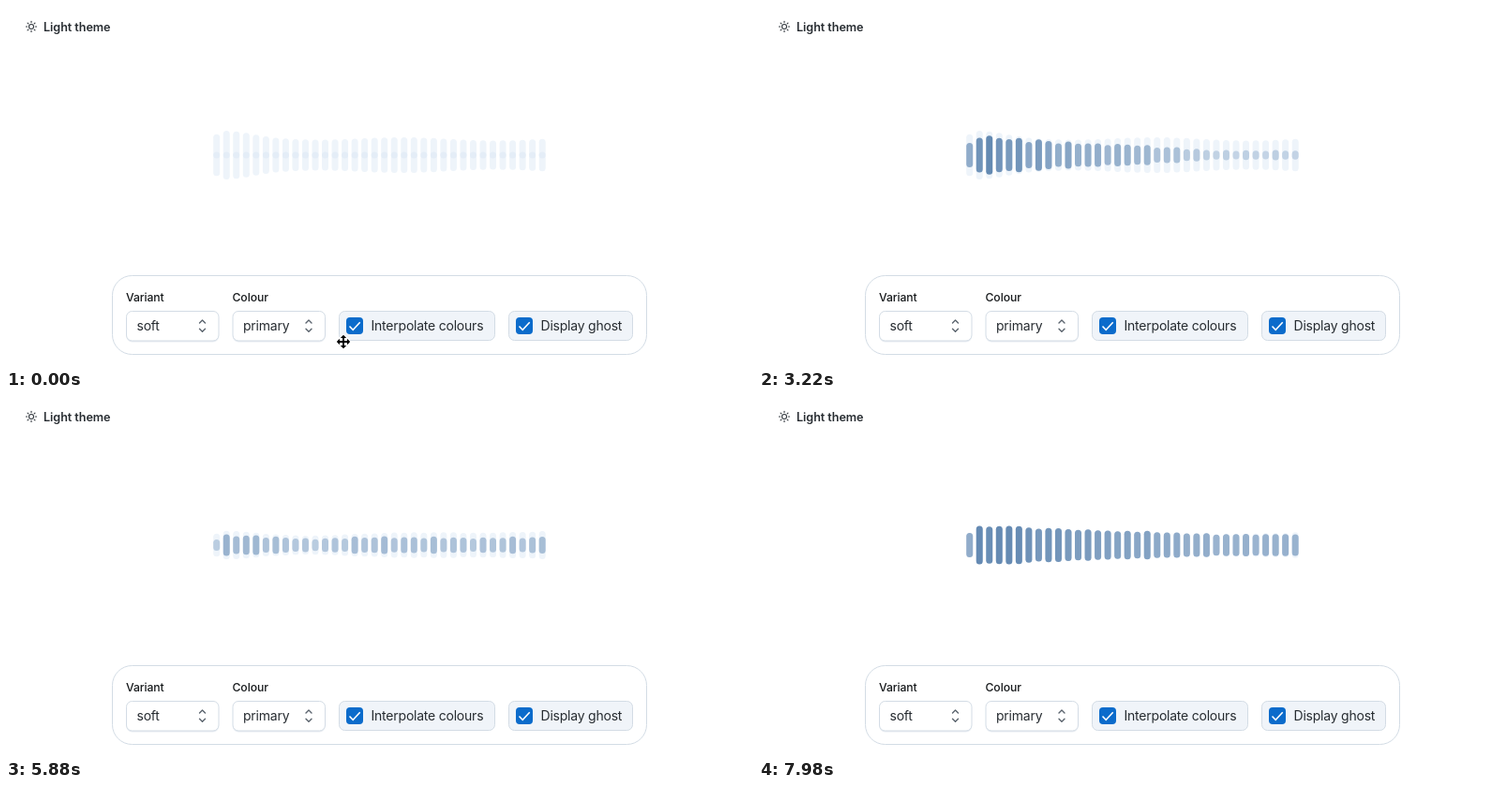
An HTML page with a canvas that plays this animation: 797 by 386 pixels, repeating every 8 s.

```html
<!DOCTYPE html>
<html lang="en">
<head>
<meta charset="utf-8">
<title>Waveform</title>
<style>
  html, body { margin: 0; width: 100%; height: 100%; overflow: hidden; background: #fff; }
  canvas, svg { position: absolute; left: 0; top: 0; width: 797px; height: 386px; }
  text { font-family: Inter, "Open Sans", sans-serif; fill: #272c31; }
  .label { font-size: 12.2px; font-weight: 500; letter-spacing: -.08px; fill: #171a1c; }
  .title { font-size: 12.6px; font-weight: 600; letter-spacing: -.05px; }
  .body { font-size: 14px; letter-spacing: -.22px; }
  .line { fill: none; stroke: #5b646e; stroke-width: 1.4; stroke-linecap: round; stroke-linejoin: round; }
  .frame { stroke: #d3dce5; }
  .soft { fill: #f0f4f9; }
  .white { fill: #fff; }
</style>
</head>
<body>
<canvas id="wave"></canvas>
<svg viewBox="0 0 797 386">
  <defs>
    <g id="select">
      <rect x=".5" y="2" width="98.5" height="31.5" rx="6" fill="#dce3eb" opacity=".6"/>
      <rect class="white frame" x=".5" y=".5" width="98.5" height="31.5" rx="6"/>
      <path class="line" d="M78.500 13l3-3 3 3M78.500 19.300l3 3 3-3"/>
    </g>
    <g id="check">
      <rect width="18" height="18" rx="4" fill="#0b6bcb"/>
      <path d="M3.500 9.500l3.700 3.800 7.500-8" fill="none" stroke="#fff" stroke-width="1.5"/>
    </g>
    <path id="arrow" d="M-1 0V-4H-3.200L0 -7.200 3.200 -4H1V0Z"/>
    <g id="arrows">
      <use href="#arrow"/>
      <use href="#arrow" transform="rotate(90)"/>
      <use href="#arrow" transform="rotate(180)"/>
      <use href="#arrow" transform="rotate(270)"/>
    </g>
  </defs>

  <g id="sun" class="line" style="stroke:#32383e;stroke-width:1.1">
    <circle cx="27" cy="22" r="2.5"/>
  </g>
  <text class="title" x="40" y="27">Light theme</text>

  <rect class="white frame" x="113.5" y="287.5" width="570" height="84" rx="21"/>
  <text class="label" x="128" y="315">Variant</text>
  <text class="label" x="241.5" y="315">Colour</text>

  <use href="#select" x="128" y="325"/>
  <text class="body" x="139.5" y="346">soft</text>
  <use href="#select" x="241.5" y="325"/>
  <text class="body" x="253" y="346">primary</text>

  <rect class="soft frame" x="355.5" y="325.5" width="166" height="31" rx="6"/>
  <use href="#check" x="363" y="332"/>
  <text class="body" x="389.5" y="346">Interpolate colours</text>
  <rect class="soft frame" x="536.5" y="325.5" width="132" height="31" rx="6"/>
  <use href="#check" x="544" y="332"/>
  <text class="body" x="570.5" y="346">Display ghost</text>

  <g id="cursor" transform="translate(360 358)">
    <use href="#arrows" stroke="#fff" stroke-width="2"/>
    <use href="#arrows"/>
  </g>
</svg>
<script>
const W = 797, H = 386, LOOP = 8000, STEP = 70;
const BARS = 34, LEFT = 224.7, PITCH = 10.53, MID = 159, THICK = 7;
const PEAK = 47, GHOST = "#eef4fa";
const QUIET = [228, 237, 247], LOUD = [85, 126, 170];

const lerp = (a, b, u) => a + (b - a) * u;
const clamp = u => Math.min(1, Math.max(0, u));
const smooth = u => u * u * (3 - 2 * u);

// Each sound: its time and its level at bars 1, 9, 17, 25 and 33.
const SPAN = 8;
const sounds = [
  { at: 0, curve: [0, 0, 0, 0, 0] },
  { at: 1120, curve: [28, 10, 11, 4, 8] },
  { at: 2450, curve: [47, 33, 24, 14, 11] },
  { at: 4130, curve: [34, 20, 17, 5, 8] },
  { at: 4970, curve: [32, 21, 21, 13, 12] },
  { at: 6720, curve: [13, 7, 14, 18, 22] },
  { at: 7980, curve: [43, 35, 30, 24, 23] },
];
const murmur = sounds[5];

// The lowest band is always weaker than its neighbour.
const bass = (i, weight) => i ? 1 : weight;

function grain(i, seed) {
  const x = Math.sin(i * 12.9898 + seed * 0.078) * 43758.5453;
  return (x - Math.floor(x)) * 2 - 1;
}

function soundLevel({ at, curve }, i) {
  const x = Math.max(0, i - 1) / SPAN;
  const k = Math.min(curve.length - 2, Math.floor(x));
  const level = lerp(curve[k], curve[k + 1], x - k);
  return level * bass(i, 0.58) * (1 + 0.06 * grain(i, at));
}

function levelAt(i, t) {
  const k = sounds.findIndex(s => s.at > t);
  if (k < 0) return soundLevel(sounds.at(-1), i);
  const a = sounds[k - 1], b = sounds[k];
  const u = (t - a.at) / (b.at - a.at);
  const flutter = Math.sin(t / 95 + i * 2.4) * 0.1 * Math.sin(Math.PI * u);
  return lerp(soundLevel(a, i), soundLevel(b, i), smooth(u)) * (1 + flutter);
}

// Held peaks: tall at the left with a slow ripple, later sinking to the murmur.
function ghostAt(i, t) {
  const hump = 12 * Math.exp(-(((i - 1) / 3.3) ** 2));
  const high = (37 - 0.1 * i + 3 * Math.cos((i - 19) * 0.35) + hump) * bass(i, 0.88);
  const low = soundLevel(murmur, i) + 5;
  return lerp(high, low, smooth(clamp((t - 5300) / 1000)));
}

function shade(level) {
  const u = clamp(level / PEAK) ** 0.9;
  return `rgb(${QUIET.map((q, c) => Math.round(lerp(q, LOUD[c], u))).join()})`;
}

const canvas = document.getElementById("wave");
const ctx = canvas.getContext("2d");
const dpr = window.devicePixelRatio || 1;
canvas.width = W * dpr;
canvas.height = H * dpr;
ctx.scale(dpr, dpr);

function pill(i, height, colour) {
  const h = Math.max(THICK, height);
  ctx.fillStyle = colour;
  ctx.beginPath();
  ctx.roundRect(LEFT + i * PITCH - THICK / 2, MID - h / 2, THICK, h, THICK / 2);
  ctx.fill();
}

const sun = document.getElementById("sun");
for (let i = 0; i < 8; i++) {
  const ray = document.createElementNS(sun.namespaceURI, "path");
  ray.setAttribute("d", "M27 17.600v-1.200");
  ray.setAttribute("transform", `rotate(${i * 45} 27 22)`);
  sun.append(ray);
}

const cursor = document.getElementById("cursor");

function draw(t) {
  ctx.clearRect(0, 0, W, H);
  for (let i = 0; i < BARS; i++) {
    const level = levelAt(i, t);
    pill(i, Math.max(ghostAt(i, t), level), GHOST);
    pill(i, level, shade(level));
  }
  cursor.style.display = t < 350 ? "" : "none";
}

const start = performance.now();
function tick() {
  const t = (performance.now() - start) % LOOP;
  draw(Math.floor(t / STEP) * STEP);
  requestAnimationFrame(tick);
}
tick();
</script>
</body>
</html>
```
